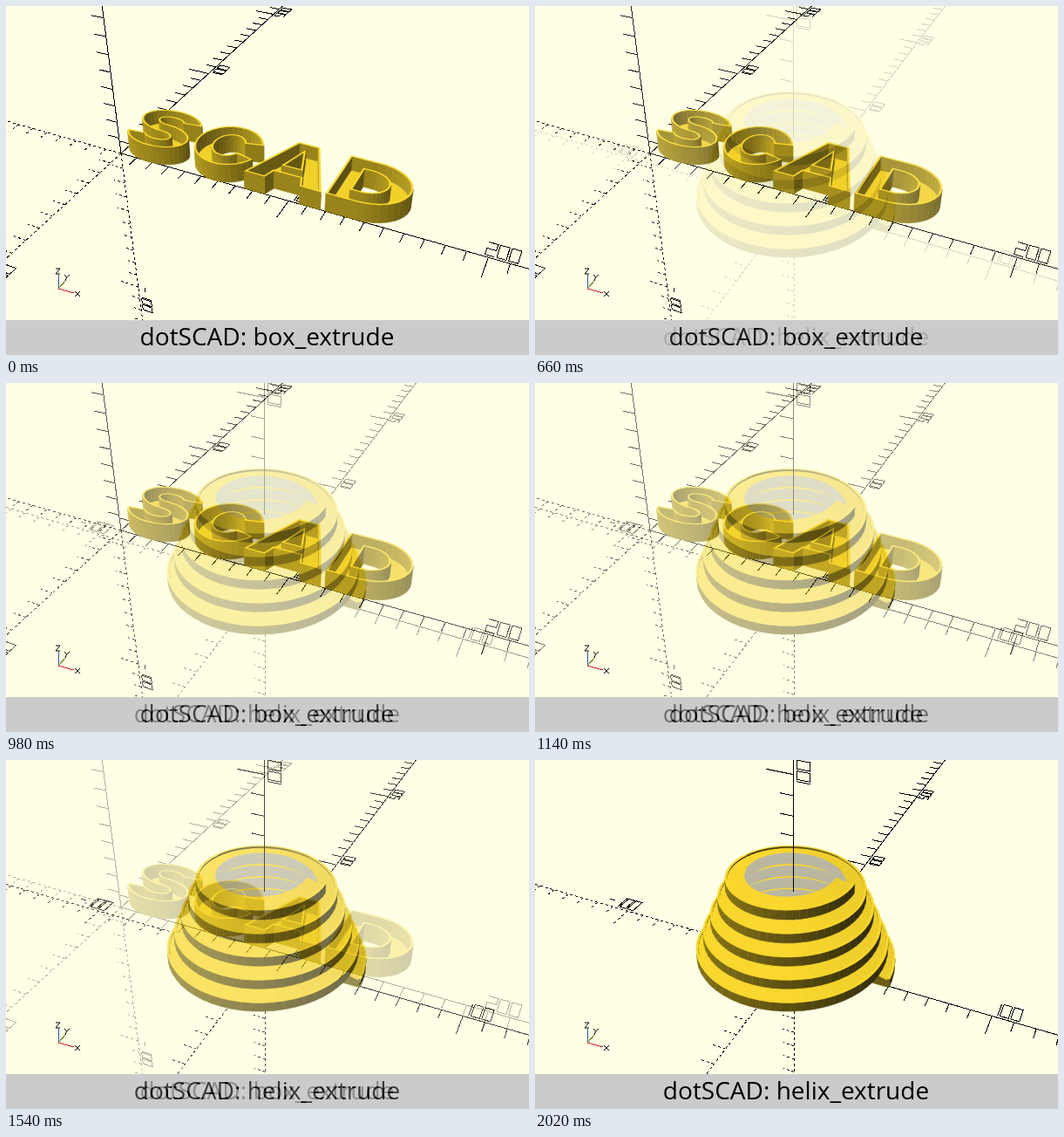
Animation of 600x400 px, one loop 8000 ms. Source, as an HTML page:

```html
<!DOCTYPE html>
<html lang="en">
<head>
<meta charset="utf-8">
<title>dotSCAD extrusions</title>
<style>
  html, body { margin: 0; width: 100%; height: 100%; overflow: hidden; background: #ffffe5; }
  svg { display: block; width: 600px; height: 400px; }
  text { font: 28px "Open Sans", "Noto Sans", sans-serif; text-anchor: middle; }
  .lines { fill: none; stroke: #000; stroke-width: 1; shape-rendering: crispEdges; }
</style>
</head>
<body>
<svg id="stage" viewBox="0 0 600 400" xmlns="http://www.w3.org/2000/svg"></svg>
<script>
const { sin, cos, PI } = Math;
const rad = deg => deg * PI / 180;

// View basis: right, up and towards the viewer.
const TILT = rad(55), TURN = rad(25);
const RIGHT = [cos(TURN), sin(TURN), 0];
const UP = [-sin(TURN) * cos(TILT), cos(TURN) * cos(TILT), sin(TILT)];
const NEAR = [sin(TURN) * sin(TILT), -cos(TURN) * sin(TILT), cos(TILT)];
const CENTER = [300, 180], FOCAL = CENTER[1] / Math.tan(rad(11.25));
const X = [1, 0, 0], Y = [0, 1, 0], Z = [0, 0, 1];

const dot = (a, b) => a.reduce((sum, v, i) => sum + v * b[i], 0);
const sub = (a, b) => a.map((v, i) => v - b[i]);
const add = (a, b, k = 1) => a.map((v, i) => v + b[i] * k);
const cross = (a, b) => a.map((_, i) => {
  const j = (i + 1) % 3, k = (i + 2) % 3;
  return a[j] * b[k] - a[k] * b[j];
});
const unit = v => v.map(c => c / Math.hypot(...v));

// Perspective with the world origin at a given screen point and distance.
function camera(ox, oy, dist) {
  const cx = (ox - CENTER[0]) * dist / FOCAL, cy = (CENTER[1] - oy) * dist / FOCAL;
  const at = p => {
    const k = FOCAL / (dist - dot(NEAR, p));
    return [CENTER[0] + (cx + dot(RIGHT, p)) * k, CENTER[1] - (cy + dot(UP, p)) * k];
  };
  const line = pts => 'M' + pts.map(p => at(p).map(c => c.toFixed(1)).join(' ')).join('L');
  return { at, line, dist };
}

function shade(normal, ambient) {
  const light = Math.min(1, ambient - .18 * dot(normal, RIGHT) + .65 * Math.max(0, normal[2]));
  return `rgb(${[249, 215, 44].map(c => Math.round(c * light))})`;
}

// Paints the faces that look at the viewer, far ones first.
function paintFaces(cam, faces, ambient) {
  return faces.filter(({ pts }) => {
    const [a, b, c] = [pts[0], pts[1], pts[pts.length - 1]].map(cam.at);
    return (b[0] - a[0]) * (c[1] - a[1]) - (b[1] - a[1]) * (c[0] - a[0]) < 0;
  }).map(({ pts, color }) => {
    const normal = unit(cross(sub(pts[1], pts[0]), sub(pts[pts.length - 1], pts[0])));
    const depth = pts.reduce((sum, p) => sum + dot(NEAR, p), 0) / pts.length;
    return { depth, fill: color || shade(normal, ambient), d: cam.line(pts) + 'Z' };
  }).sort((a, b) => a.depth - b.depth)
    .map(f => `<path d="${f.d}" fill="${f.fill}" stroke="${f.fill}" stroke-width=".5"/>`).join('');
}

// ---- axes ----
// Strokes through the corners of a 2 x 3 grid, counted row by row from the bottom left.
const GLYPHS = { 0: '01540', 1: '15', 2: '453201', '-': '23' };

function label(cam, axis, t) {
  const step = cam.dist / 80;
  const up = axis === X ? Y : X;
  const height = step * (axis === X ? 1.75 : 1.3);
  const down = axis === Z && t < 0;
  const along = down ? [0, 0, -1] : axis;
  const back = down ? .3 : axis === Z ? 1.4 : t < 0 ? 3.3 : .35;
  const start = add(axis.map(c => c * t), along, -back * step);
  return [...String(t)].map((ch, i) => cam.line([...GLYPHS[ch]].map(k =>
    add(add(start, along, (i + k % 2 * .8) * step), up, 1.5 + (k >> 1) / 2 * height)))).join('');
}

function paintAxes(cam) {
  const small = cam.dist / 60;
  let solid = '', dashed = '';
  for (const axis of [X, Y, Z]) {
    const tickDir = axis === X ? Y : X;
    const on = t => axis.map(c => c * t);
    solid += cam.line([on(0), on(400)]);
    dashed += cam.line([on(0), on(-400)]);
    for (let t = 10; t <= 400; t += 10) {
      const big = t % 100 === 0;
      const tick = p => cam.line([p, add(p, tickDir, -small * (big ? 2 : 1))]);
      solid += tick(on(t));
      dashed += tick(on(-t));
      if (big && t <= 200) solid += label(cam, axis, t) + label(cam, axis, -t);
    }
  }
  return `<g class="lines"><path d="${solid}"/><path d="${dashed}" stroke-dasharray="3 3"/></g>`;
}

const gizmo = `<g class="lines"><path d="M60 324V308" stroke="#3355aa"/>
  <path d="M60 324L69 314" stroke="#6f8a20"/><path d="M60 324L78 329" stroke="#e02020"/></g>
  <path d="M57 301H62L57 307H62M67 308L69.500 311L73 308M69.500 311L68 315M79 327L85 333M85 327L79 333"
    fill="none" stroke="#000"/>`;

// ---- hollow letters ----
// Points on an ellipse between two angles in degrees, in either direction.
function arc(cx, cy, rx, ry, from, to) {
  const count = Math.ceil(Math.abs(to - from) / 10);
  return Array.from({ length: count + 1 }, (_, i) => {
    const a = rad(from + (to - from) * i / count);
    return [cx + rx * cos(a), cy + ry * sin(a)];
  });
}

const shift = (loop, x, y) => loop.map(p => add(p, [x, y]));
const CAP = 36, MID = CAP / 2, OVER = MID + .5;

// Two stacked bowls; the second half is the first one turned by 180°.
function letterS(x) {
  const pen = 3.8, cy = (OVER - pen) / 2, outer = OVER - cy, inner = outer - 2 * pen;
  const half = [...arc(0, -cy, 18, outer, 190, 450), ...arc(0, cy, 7, inner, 270, 12)];
  return [shift([...half, ...half.map(p => [-p[0], -p[1]])], x, MID)];
}

function letterC(x) {
  return [shift([...arc(0, 0, OVER, OVER, 22, 338), ...arc(0, 0, 8, 9.5, 332, 28)], x, MID)];
}

function letterA(x) {
  const mirror = pts => pts.map(([px, py]) => [-px, py]).reverse();
  const right = [[7.3, 6.5], [9.5, 0], [21, 0], [6, CAP]];
  return [shift([...right, ...mirror(right)], x, 0), shift([[-4.5, 13.5], [0, 27.5], [4.5, 13.5]], x, 0)];
}

function letterD(x) {
  const bowl = (left, mid, rx, ry) => [[left, MID - ry], ...arc(mid, MID, rx, ry, -90, 90), [left, MID + ry]];
  return [bowl(x, x + 16, 22, MID), bowl(x + 10.5, x + 15, 11, 9).reverse()];
}

// Moves a loop towards its left side.
function inset(loop, d) {
  const n = loop.length;
  return loop.map((p, i) => {
    const [ax, ay] = unit(sub(p, loop[(i + n - 1) % n]));
    const [bx, by] = unit(sub(loop[(i + 1) % n], p));
    const k = d / (1 + ax * bx + ay * by);
    return [p[0] - (ay + by) * k, p[1] + (ax + bx) * k];
  });
}

function paintLetter(cam, loops) {
  const top = 11, floor = 2.5;
  const inner = loops.map(loop => inset(loop, 1));
  const outline = (list, z) => list.map(loop => cam.line(loop.map(p => [...p, z])) + 'Z').join('');
  const walls = (loop, z) => loop.map((p, i) => {
    const q = loop[(i + 1) % loop.length];
    return { pts: [[...p, z], [...q, z], [...q, top], [...p, top]] };
  });
  const faces = [...loops.flatMap(l => walls(l, 0)), ...inner.flatMap(l => walls([...l].reverse(), floor))];
  return `<path d="${outline(inner, floor)}" fill="#f2d02a" fill-rule="evenodd"/>` + paintFaces(cam, faces, .54) +
    `<path d="${outline([...loops, ...inner], top)}" fill="#f9d72c" fill-rule="evenodd"/>`;
}

// ---- conical helix ----
function paintHelix(cam) {
  const turns = 5, perTurn = 60, rise = 9.7, shrink = 4, radius = 40.3;
  const profile = [[1, 0], [10, 0], [10, 5], [9, 5], [9, 4], [1, 6]];
  const spot = (step, [r, z]) => {
    const turn = step / perTurn, angle = turn * 2 * PI, dist = radius - shrink * turn + r;
    return [dist * cos(angle), dist * sin(angle), rise * turn + z - .8];
  };
  const faces = [{ pts: profile.map(p => spot(0, p)) }];
  for (let s = 0; s < turns * perTurn; s++) {
    profile.forEach((a, i) => {
      const b = profile[(i + 1) % profile.length];
      const inside = i === profile.length - 1;
      faces.push({
        pts: [spot(s, a), spot(s + 1, a), spot(s + 1, b), spot(s, b)],
        color: inside && '#b9b6a2'
      });
    });
  }
  return paintFaces(cam, faces, .36);
}

// ---- scenes ----
const scene = (id, caption, content) => `<g id="${id}"><rect width="600" height="400" fill="#ffffe5"/>
  ${content}${gizmo}<rect y="360" width="600" height="40" fill="#cbcbcb"/>
  <text x="299.500" y="389">${caption}</text></g>`;

const boxCam = camera(132, 169, 431), helixCam = camera(297, 228, 395);
const word = [letterS(18), letterC(57.5), letterA(96.2), letterD(119.5)];
const innerAxis = `<path class="lines" d="${helixCam.line([[0, 0, 40], [0, 0, 120]])}"/>`;
document.getElementById('stage').innerHTML =
  scene('box', 'dotSCAD: box_extrude', paintAxes(boxCam) + word.map(l => paintLetter(boxCam, l)).join('')) +
  scene('helix', 'dotSCAD: helix_extrude', paintAxes(helixCam) + paintHelix(helixCam) + innerAxis);
const helix = document.getElementById('helix');

// Cross-fade in 20 steps of 80 ms, starting at 500 ms.
function render(time) {
  const step = Math.floor((time % 8000 - 500) / 80) + 1;
  helix.setAttribute('opacity', Math.max(0, Math.min(1, step / 20)));
}

const begin = performance.now();
function tick() {
  render(performance.now() - begin);
  requestAnimationFrame(tick);
}
tick();
</script>
</body>
</html>
```
